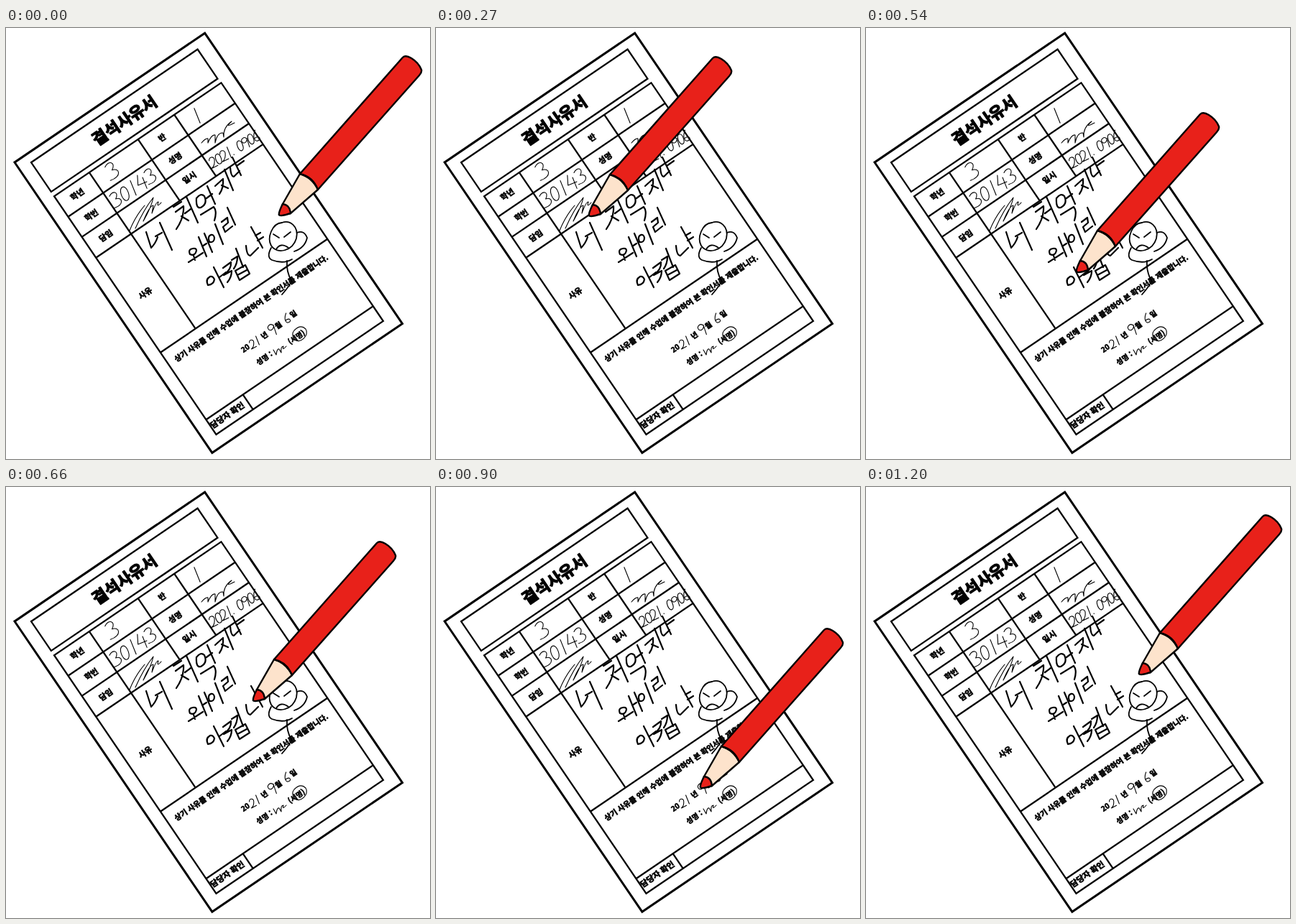
Animation, 590 px wide and 600 px high, one loop 1350 ms. Source, as an HTML page:

```html
<!DOCTYPE html>
<html lang="ko">
<head>
<meta charset="utf-8">
<style>
html, body { margin: 0; width: 100%; height: 100%; overflow: hidden; background: #fff; }
svg { display: block; width: 590px; height: 600px; }
text { font-family: "Noto Sans CJK KR", "Noto Sans CJK", sans-serif; font-weight: 900; text-anchor: middle; stroke: #000; stroke-linejoin: round; }
.ink { fill: none; stroke: #000; stroke-linecap: round; stroke-linejoin: round; }
</style>
</head>
<body>
<svg viewBox="0 0 590 600">
  <g transform="translate(12 187) rotate(-34.2)">
    <g fill="none" stroke="#000" stroke-width="2.3">
      <rect width="320" height="489" fill="#fff" stroke-width="3"/>
      <rect x="19" y="13" width="280" height="49.5"/>
      <rect x="19" y="70" width="281" height="401"/>
      <path d="M19 104.5H300M19 138.5H300M19 173.5H300M19 333H300M19 446H300M78 70V333M160 70V173.5M221 70V173.5M81 446V471"/>
    </g>
    <g id="labels"></g>
  </g>
  <g id="thin" class="ink" stroke-width="1.1"></g>
  <g id="bold" class="ink" stroke-width="2.2"></g>
  <g id="pencil" stroke="#000" stroke-width="2.4" stroke-linejoin="round">
    <path fill="#fde3cc" d="M409 203L385 245L380 260L396 258L434 225Q426 208 409 203Z"/>
    <path fill="#e8211a" d="M385 245Q379 257 380 260Q381 263 396 258Q395 246 385 245Z"/>
    <path fill="#e8211a" d="M409 203L552 41Q556 37 564 42Q574 48 578 58Q579 62 575 66L434 225Q427 207 409 203Z"/>
  </g>
</svg>
<script>
const byId = id => document.getElementById(id);

function add(parent, tag, attrs, content = "") {
  const el = document.createElementNS("http://www.w3.org/2000/svg", tag);
  for (const key in attrs) el.setAttribute(key, attrs[key]);
  el.textContent = content;
  byId(parent).appendChild(el);
}

// Printed form: text, centre x, centre y, size
[
  ["결석사유서", 159, 38, 22.4],
  ["학년", 47, 86, 11], ["학번", 47, 121, 11], ["담임", 47.5, 156, 11],
  ["반", 189, 87, 11], ["성명", 188, 121, 11], ["일시", 189, 154.5, 11],
  ["사유", 48, 253, 11],
  ["상기 사유를 인해 수업에 불참하여 본 확인서를 제출합니다.", 158, 353, 10.5],
  ["20", 120, 394.5, 10], ["년", 152, 394.5, 10], ["월", 176, 394, 10], ["일", 202, 392.5, 10],
  ["성명 :", 134, 421, 10], ["(서명)", 187.5, 422, 10],
  ["담당자 확인", 47, 457.5, 11.2]
].forEach(([str, x, y, size]) => add("labels", "text",
  { x, y: y + size * .36, "font-size": size, "stroke-width": size * .06 }, str));

const digits = {
  0: "M1-9C-6-9-6 9 0 9S7-8 1-9",
  1: "M0-10V10",
  2: "M-5-5C-4-12 6-10 4-3C2 4-3 8-6 9L6 8",
  3: "M-6-7C0-13 8-8 0-1C9-1 8 10-6 9",
  4: "M-2-10L-6 2H6M3-5V10",
  6: "M2-10C-6-2-7 9 0 9S6 0-4 3",
  9: "M5-5C2-12-6-8-5-3S4 1 5-6L4 10"
};

// Handwritten digits: each follows the previous one along a slanted line
function number(str, x, y, scale, dx = 0, dy = 0) {
  [...str].forEach((ch, i) => digits[ch] && add("thin", "path", {
    d: digits[ch],
    "stroke-width": 1.1 / scale,
    transform: `translate(${x + i * dx} ${y + i * dy}) rotate(-22) scale(${scale})`
  }));
}
number("3", 148, 199, 1.25);
number("30143", 153, 239, 1.1, 12, -8.2);
number("1", 266, 122, 1.1);
number("2021.0906", 288, 187, .8, 7.5, -4.6);
number("21", 343, 440, .65, 7, -5);
number("9", 370, 420, .85);
number("6", 391, 404, .7);

const draw = (group, paths) => paths.forEach(d => add(group, "path", { d }));

draw("thin", [
  "M172 282Q180 262 193 247M180 279Q192 252 205 236Q202 250 191 269Q200 247 205 247L203 258Q209 241 212 242Q209 251 216 243",
  "M272 160Q278 153 281 154L281 160Q286 148 291 149L291 160Q294 145 302 146L303 152Q302 138 314 130Q303 140 318 132",
  "M317 176l.4.3",
  "M372 448L376 455Q377 446 380 447L383 452Q382 443 386 443Q384 450 390 443",
  "M401 421Q410 412 417 419C423 428 409 440 402 434Q396 427 401 421"
]);

draw("bold", [
  // first line
  "M195 284L202 306Q208 300 211 291M208 290L217 285M214 271L231 309",
  "M233 249L244 242M236 256L247 248Q248 264 237 280M244 262L254 268M249 258L257 252M251 235L267 271",
  "M265 237Q264 252 271 250Q281 245 276 234Q271 229 265 237M279 237L287 231M280 220L291 245M271 260L289 249Q294 255 290 268",
  "M291 220L302 210Q303 223 297 231M300 219L309 223M304 197L316 226",
  "M312 194Q313 207 317 207L325 199M315 180L327 205M321 192L331 185",
  // second line
  "M260 307Q253 308 256 315Q263 318 265 310Q265 306 260 307M261 317L263 323M254 326L274 313M268 291L279 318M273 304L279 300M276 286L287 312",
  "M285 288Q280 290 283 298Q290 299 290 292Q289 287 285 288M291 273L302 301",
  "M300 270L308 264L309 271L302 277L305 284L315 276M308 250L319 274",
  // third line
  "M284 346Q277 350 281 358Q289 357 290 350Q288 345 284 346M289 333L303 361M297 347L306 340",
  "M302 334L313 326Q314 336 303 344L314 338Q314 347 308 354M314 323L322 318Q322 328 317 335M320 307L330 333",
  "M319 338L325 351L339 342L333 330L319 338M322 344L335 337",
  "M334 303Q335 317 340 317L351 306M341 277L357 306M347 289L354 285M350 296L358 291"
]);

// frowning doodle
add("bold", "g", { id: "doodle", "stroke-width": 1.8 });
draw("doodle", [
  "M384 271C370 272 363 292 369 303C378 316 399 310 404 293C408 276 395 267 384 271",
  "M372 287L380 292M387 291L396 284M376 308Q382 298 393 306",
  "M369 306Q362 319 370 323Q386 329 398 322M405 285Q415 281 419 292Q416 306 401 311",
  "M391 324Q390 340 397 351Q398 355 384 371"
]);

// Pencil tip path: time, x, y
const keys = [
  [0, 381, 261], [150, 266, 247], [210, 228, 235], [270, 214, 262], [390, 228, 327],
  [465, 258, 342], [540, 294, 340], [660, 345, 298], [780, 386, 320],
  [900, 369, 419], [1020, 374, 355], [1200, 381, 261]
];

// Time-aware cubic interpolation, flat at each turning point
function slope(i, k) {
  const a = keys[i - 1], b = keys[i], c = keys[i + 1];
  if (!a) return (c[k] - b[k]) / (c[0] - b[0]);
  const s = (b[k] - a[k]) / (b[0] - a[0]), e = (c[k] - b[k]) / (c[0] - b[0]);
  return s * e <= 0 ? 0 : 2 * s * e / (s + e);
}

function along(t, k) {
  let i = 0;
  while (i < keys.length - 2 && t >= keys[i + 1][0]) i++;
  const p = keys[i], q = keys[i + 1], span = q[0] - p[0], f = (t - p[0]) / span;
  if (i === keys.length - 2) return p[k] + (q[k] - p[k]) * f;
  const g = 1 - f;
  return g * g * (1 + 2 * f) * p[k] + f * f * (3 - 2 * f) * q[k]
    + span * f * g * (g * slope(i, k) - f * slope(i + 1, k));
}

const LOOP = 1350, STEP = 30, REST = 1200;

function render(now) {
  const t = Math.min(REST, Math.floor((now % LOOP) / STEP) * STEP);
  const x = along(t, 1) - keys[0][1], y = along(t, 2) - keys[0][2];
  byId("pencil").setAttribute("transform", `translate(${x.toFixed(2)} ${y.toFixed(2)})`);
}

let start;
function tick(now) {
  start ??= now;
  render(now - start);
  requestAnimationFrame(tick);
}
render(0);
requestAnimationFrame(tick);
</script>
</body>
</html>
```
